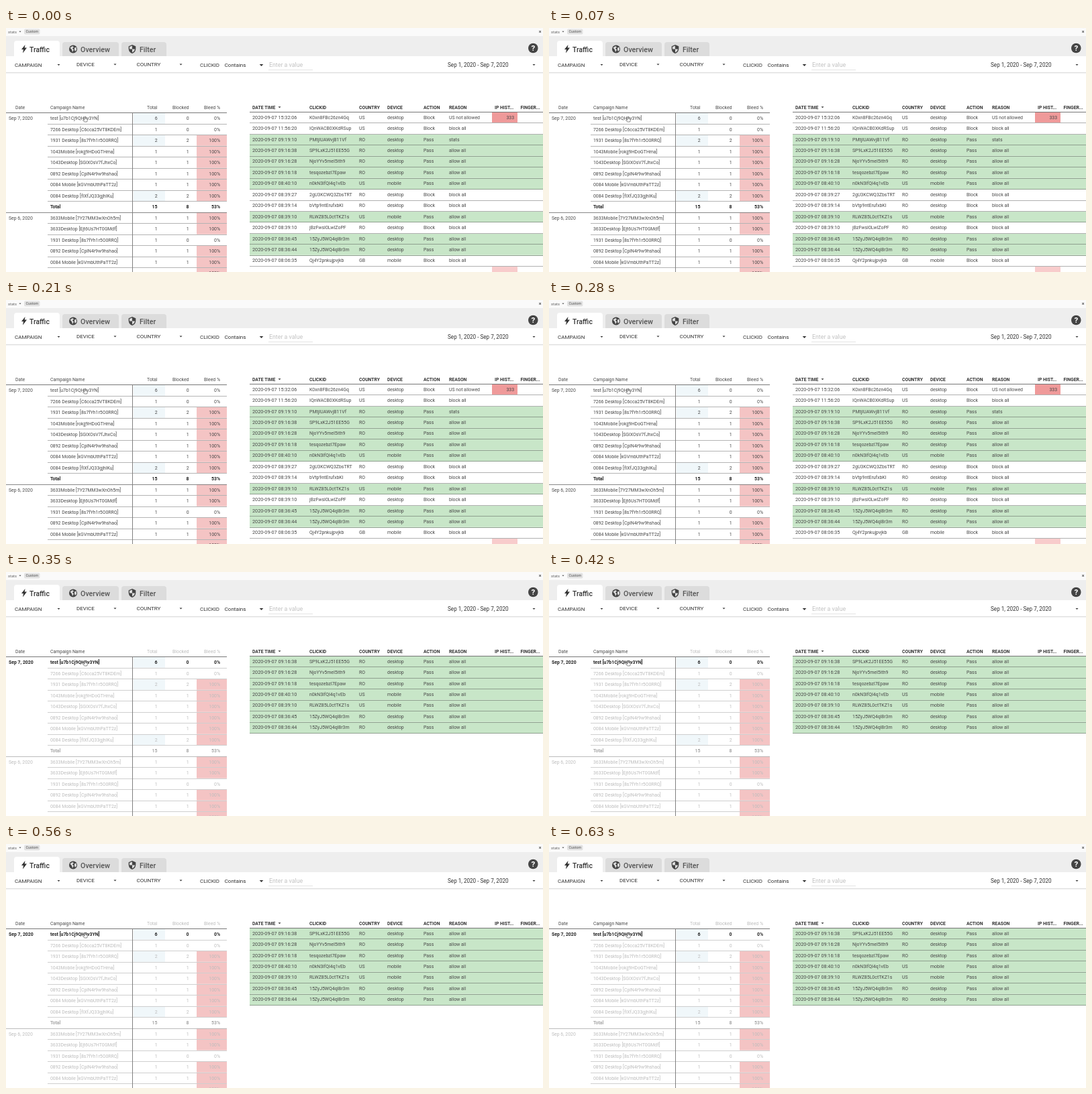
Animation, 800 px wide and 364 px high, one loop 840 ms. Source, as an HTML page with a canvas:

```html
<!DOCTYPE html>
<html lang="en">
<head>
<meta charset="utf-8">
<title>Traffic stats</title>
<style>
html, body { margin: 0; width: 100%; height: 100%; overflow: hidden; background: #fff; }
canvas { display: block; width: 800px; height: 364px; }
</style>
</head>
<body>
<canvas id="stage"></canvas>
<script>
const LOOP = 840, CLICK = 350;
const W = 800, H = 364;
const canvas = document.getElementById('stage');
const ctx = canvas.getContext('2d');
const ratio = window.devicePixelRatio || 1;
canvas.width = W * ratio;
canvas.height = H * ratio;
ctx.scale(ratio, ratio);

const INK = '#484848', DARK = '#333', FADED = '#bcbcbc';
const PINK = '#f4c4c4', GREEN = '#c8e6c8', RED = '#ef9a9a', BLUE = '#f0f7fa';

// name | total | blocked | bleed
const campaigns = [
  'test [u7b1Cj9QH0v3YN]|6|0|0%',
  '7266 Desktop [C6cca25VT8KDEm]|1|0|0%',
  '1931 Desktop [8s7fYh1r5O0RRQ]|2|2|100%',
  '1043Mobile [rokjj9HDoGTHma]|1|1|100%',
  '1043Desktop [SGlXOsV7fJhxCo]|1|1|100%',
  '0892 Desktop [CplN4r9w9hshao]|1|1|100%',
  '0084 Mobile [kGVmbUthPaTT2z]|1|1|100%',
  '0084 Desktop [fIXfJQ33gjhIKu]|2|2|100%',
  'Total|15|8|53%',
  '3633Mobile [7Y27MM3wXnOh5m]|1|1|100%',
  '3633Desktop [Ejt6Us7HT0GMdf]|1|1|100%',
  '1931 Desktop [8s7fYh1r5O0RRQ]|1|0|0%',
  '0892 Desktop [CplN4r9w9hshao]|1|1|100%',
  '0084 Mobile [kGVmbUthPaTT2z]|1|1|100%',
  '|||100%'
].map(s => s.split('|'));

// time | click id | country | device | action | reason
const clicks = [
  '15:32:06|K0xn8FBc26zn4Gq|US|desktop|Block|US not allowed',
  '11:56:20|IQnWACB0XKdRSup|US|desktop|Block|block all',
  '09:19:10|PMtjIUAWvjB11Vf|RO|desktop|Pass|stats',
  '09:16:38|SP9LxK2J51EE55G|RO|desktop|Pass|allow all',
  '09:16:28|NjoYYv5meI5ith9|RO|desktop|Pass|allow all',
  '09:16:18|tesqozebzl7Epaw|RO|desktop|Pass|allow all',
  '08:40:10|n0kN3lfQI4q1vEb|US|mobile|Pass|allow all',
  '08:39:27|2gU3KCWQ3ZbsTRT|RO|desktop|Block|block all',
  '08:39:14|bVtp9ntErufxbKI|RO|desktop|Block|block all',
  '08:39:10|RLWZ85L0ctTKZ1s|US|mobile|Pass|allow all',
  '08:39:10|jBzFwsI0LwIZoPF|RO|desktop|Block|block all',
  '08:36:45|15ZyJ5WQ4ql8r3m|RO|desktop|Pass|allow all',
  '08:36:44|15ZyJ5WQ4ql8r3m|RO|desktop|Pass|allow all',
  '08:06:35|Qj4Y2pnkujpvjkb|GB|mobile|Block|block all'
].map(s => s.split('|'));
const allowed = clicks.filter(c => c[5] === 'allow all');
const columns = [367, 452, 526, 568, 622, 660];

function text(s, x, y, size, color = INK, weight = 400, align = 'left') {
  ctx.font = `${weight} ${size}px Roboto, Arial, sans-serif`;
  ctx.fillStyle = color;
  ctx.textAlign = align;
  ctx.fillText(s, x, y);
}

function box(x, y, w, h, color, radii) {
  ctx.fillStyle = color;
  ctx.beginPath();
  if (radii) ctx.roundRect(x, y, w, h, radii);
  else ctx.rect(x, y, w, h);
  ctx.fill();
}

const rule = (x1, x2, y, color) => box(x1, Math.round(y), x2 - x1, 1, color);

function disc(x, y, r, color) {
  ctx.fillStyle = color;
  ctx.beginPath();
  ctx.arc(x, y, r, 0, Math.PI * 2);
  ctx.fill();
}

function shape(path, x, y, fill, stroke, scale = 1) {
  const p = new Path2D(path);
  ctx.save();
  ctx.translate(x, y);
  ctx.scale(scale, scale);
  ctx.fillStyle = fill;
  ctx.fill(p);
  if (stroke) {
    ctx.strokeStyle = stroke;
    ctx.lineWidth = 0.8;
    ctx.stroke(p);
  }
  ctx.restore();
}

const arrow = (x, y, r = 2) =>
  shape(`M${-r} ${-r / 2}H${r}L0 ${r / 2}Z`, x, y, DARK);

function drawTop() {
  box(0, 0, W, 12, '#fafafa');
  text('stats', 3, 7.6, 5.8, '#666');
  arrow(21, 5.5, 1.5);
  box(27, 1.5, 23.5, 8, '#e2e2e2', 2);
  text('Custom', 29.5, 7.4, 5.4, '#555');
  text('×', 795.5, 8, 7, '#444', 500, 'center');

  box(0, 12, W, 30, '#eeeeee');
  box(12, 19, 68, 23, '#fff', [4, 4, 0, 0]);
  box(84, 21, 84, 21, '#dcdcdc', [4, 4, 0, 0]);
  box(172, 21, 67, 21, '#dcdcdc', [4, 4, 0, 0]);

  shape('M1.5 -6L-4 1H-1L-2 6.5L4 -1.5H.7Z', 27, 31, DARK);
  disc(100, 31.5, 6, '#444');
  shape('M-4.5 -2L-1 -4.5L1 -3L-1 -1L1 1L-1 4.5L-2 1Z', 100, 31.5, '#dcdcdc');
  shape('M2 -2L4.5 -3L5 1L3 3.5L2 1Z', 100, 31.5, '#dcdcdc');
  shape('M0 -6.5L5.3 -4.3V-.8C5.3 3 3 5.5 0 6.5C-3 5.5 -5.3 3 -5.3 -.8V-4.3Z', 188, 31.5, '#444');
  shape('M0 -5V0H4C3.7 2.4 2 4.2 0 5V0H-4V-3.4Z', 188, 31.5, '#dcdcdc');

  text('Traffic', 35, 35.5, 10.4, DARK, 500);
  text('Overview', 111, 35.5, 10.7, '#555', 500);
  text('Filter', 199, 35.5, 10.6, '#555', 500);
  disc(785.3, 30, 7.3, '#444');
  text('?', 785.3, 34.2, 11.5, '#fff', 700, 'center');
}

function drawFilters() {
  rule(0, W, 66, '#dedede');
  rule(0, W, 67, '#f3f3f3');
  text('CAMPAIGN', 13, 57.8, 8, DARK);
  text('DEVICE', 105, 57.3, 8, DARK);
  text('COUNTRY', 194.5, 57.3, 8, DARK);
  text('CLICKID', 289, 58, 7.9, DARK);
  text('Contains', 325.5, 58, 8.1, DARK);
  text('Enter a value', 392, 58, 8.8, '#c2c2c2');
  rule(391, 457, 62, '#e4e4e4');
  text('Sep 1, 2020 - Sep 7, 2020', 658, 57.8, 8.15, DARK);
  arrow(78.5, 55);
  arrow(162.5, 54.5);
  arrow(260.5, 54.5);
  arrow(380.5, 55.5, 2.8);
  arrow(786.5, 55);
}

function drawCampaigns(picked) {
  const top = 126.3, step = 16.5, size = 6.9;
  const soft = picked ? FADED : INK;

  campaigns.forEach((row, i) => {
    const y = top + i * step;
    if (row[1] === '6' || row[1] === '2') box(190, y, 47, step, BLUE);
    if (row[3] === '100%') box(284, y, 45, step, PINK);
  });

  text('Date', 14, 121.2, size);
  text('Campaign Name', 66, 121.2, size);
  text('Total', 225.5, 121.2, size, soft, 400, 'right');
  text('Blocked', 272.5, 121.2, size, soft, 400, 'right');
  text('Bleed %', 319, 121.2, size, soft, 400, 'right');

  campaigns.forEach((row, i) => {
    const y = top + i * step;
    const base = y + 10.7;
    const active = picked && i === 0;
    const total = row[0] === 'Total';
    const weight = active || total ? 700 : 400;
    let color = active ? '#222' : soft;
    if (total) color = picked ? '#a8a8a8' : '#222';
    if (i === 0) text('Sep 7, 2020', 4, base, size, color, weight);
    if (i === 9) text('Sep 6, 2020', 4, base, size, color);
    text(row[0], 66, base, size, color, weight);
    text(row[1], 225.5, base, size, color, weight, 'right');
    text(row[2], 272.5, base, size, color, weight, 'right');
    text(row[3], 319, base, size, color, weight, 'right');
    if (i && i !== 9) rule(62, 329, y, picked ? '#cfcfcf' : '#b4b4b4');
  });
  rule(0, 329, top, '#777');
  rule(0, 329, top + 9 * step, picked ? '#bbb' : '#888');
  box(188, top, 1, H - top, '#808080');
}

function drawClicks(picked) {
  const top = 125, step = 16.45;
  const rows = picked ? allowed : clicks;
  const heads = ['DATE TIME', 'CLICKID', 'COUNTRY', 'DEVICE', 'ACTION', 'REASON', 'IP HIST...', 'FINGER...'];
  heads.forEach((s, i) => text(s, [...columns, 728, 766.5][i], 120.6, 6.8, DARK, 700));
  arrow(407.5, 118.3, 2);

  rows.forEach((row, i) => {
    const y = top + i * step;
    if (row[4] === 'Pass') box(363, y, W - 363, step, GREEN);
  });
  if (!picked) {
    box(724, top, 38, step, RED);
    box(724, top + 14 * step, 38, 10, '#f8cccc');
    text('333', 757, 135.6, 6.9, INK, 400, 'right');
  }
  rows.forEach((row, i) => {
    const y = top + i * step;
    row.forEach((s, c) => {
      const label = c ? s : '2020-09-07 ' + s;
      text(label, columns[c], y + 10.6, c ? 6.95 : 7.25);
    });
    rule(363, W, y + step, row[4] === 'Pass' ? '#8fa08f' : '#b0b0b0');
  });
  rule(363, W, top, '#777');
}

function drawHand() {
  shape('M-1 -4Q0 -5 1 -4V-1L4 0Q5 .5 4.6 2L3.8 5H-1L-4 1.5Q-3.5 .2 -2.2 1L-1 1.8Z',
    117.6, 136, '#fff', '#444', 0.8);
}

function draw(now) {
  const picked = now % LOOP >= CLICK;
  ctx.fillStyle = '#fff';
  ctx.fillRect(0, 0, W, H);
  drawTop();
  drawFilters();
  drawCampaigns(picked);
  drawClicks(picked);
  drawHand();
}

const start = performance.now();
function tick() {
  draw(performance.now() - start);
  requestAnimationFrame(tick);
}
tick();
</script>
</body>
</html>
```
